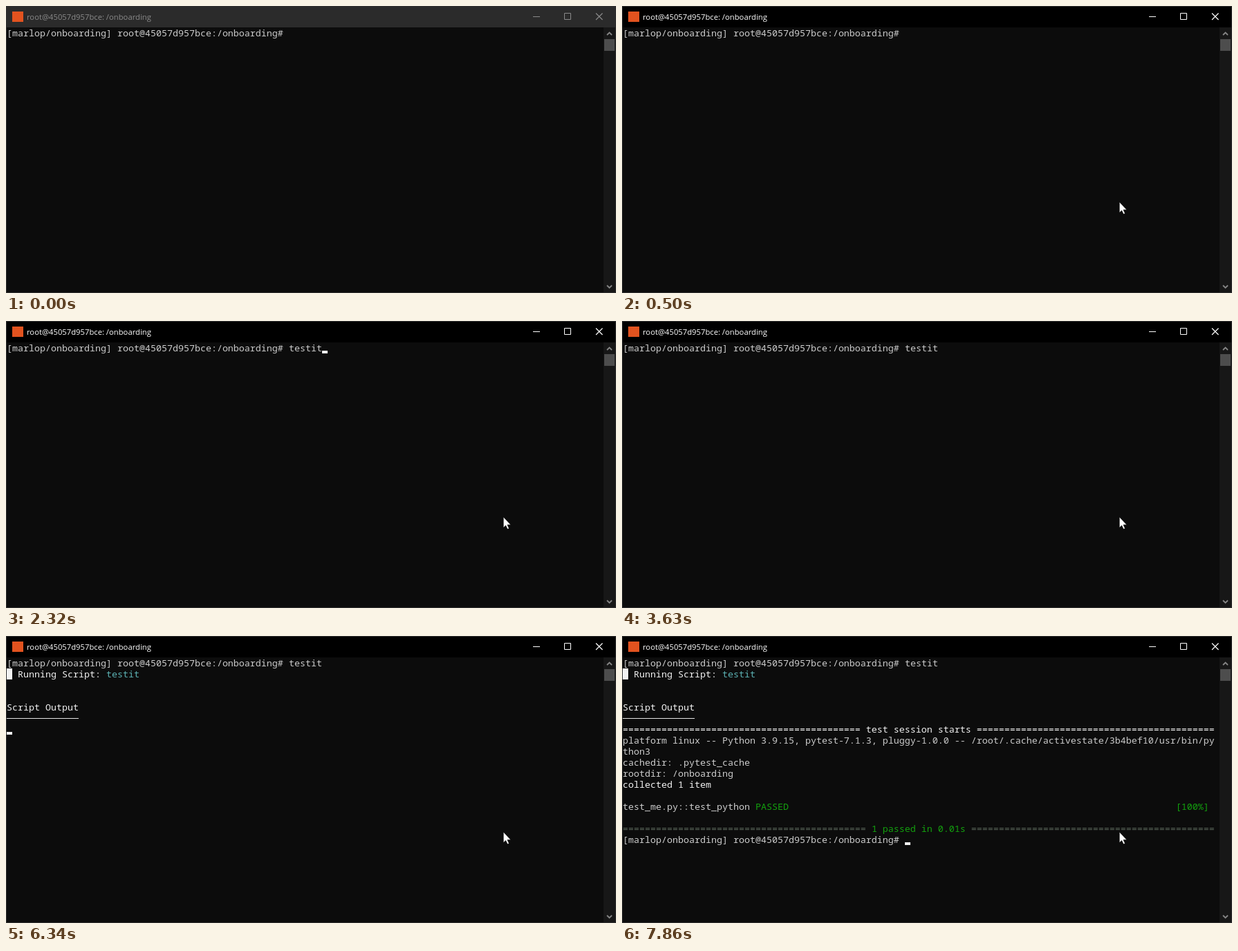
Animation, 882 px wide and 416 px high, one loop 8000 ms. Source, as an HTML page:

```html
<!DOCTYPE html>
<html lang="en">
<head>
<meta charset="utf-8">
<title>Terminal test run</title>
<style>
  html, body { margin: 0; width: 100%; height: 100%; overflow: hidden; background: #0c0c0c; }
  #stage { position: relative; width: 882px; height: 416px; overflow: hidden; background: #0c0c0c; }
  #stage > * { position: absolute; }

  /* every timed part shares one 8 s clock with hard cuts */
  .bar, .typed, .head, .result, .caret, .mouse { animation: 8s step-end infinite; }

  .bar {
    left: 0; top: 0; width: 882px; height: 31px;
    font: 11.25px/31px "Open Sans", "Noto Sans", sans-serif;
    animation-name: focus;
  }
  .bar span { position: absolute; left: 30px; white-space: pre; }
  .bar svg { position: absolute; left: 0; top: 0; }
  .icon { position: absolute; left: 9px; top: 8px; width: 16px; height: 15px; background: #e2531f; }
  .frame { inset: 0; border: 1px solid #2f2f2f; }
  .scroll { left: 864px; top: 31px; }

  pre {
    left: 1px; margin: 0; color: #ccc;
    font: 13.3333px/16px "Noto Sans Mono", "DejaVu Sans Mono", monospace;
    font-variant-ligatures: none;
  }
  pre b { font-weight: 400; color: #f2f2f2; }
  .cyan { color: #5cb3b5; }
  .green { color: #13a10e; }
  .dim { color: #5b675b; }

  .prompt { top: 31px; }
  .typed { left: 409px; top: 31px; overflow: hidden; animation-name: type; }
  .head { left: 0; top: 0; animation-name: head; }
  .head > * { position: absolute; }
  .head pre { top: 47px; }
  .block { left: 1px; top: 47px; width: 8px; height: 16px; background: #f2f2f2; }
  .rule { left: 1px; top: 119px; width: 104px; height: 1px; background: #e4e4e4; }
  .result { top: 127px; animation-name: result; }

  .caret { left: 0; top: 0; width: 8px; height: 4px; background: #f2f2f2; animation-name: caret; }
  .mouse { left: 0; top: 0; animation-name: mouse; }

  @keyframes focus {
    0% { background: #2b2b2b; color: #8a8a8a; }
    6.25%, 100% { background: #000; color: #fff; }
  }
  @keyframes type {
    0% { width: 0; }
    22.75% { width: 8px; animation-timing-function: steps(5); }
    29%, 100% { width: 48px; }
  }
  @keyframes head {
    0% { opacity: 0; }
    65.25%, 100% { opacity: 1; }
  }
  @keyframes result {
    0% { opacity: 0; }
    98.25%, 100% { opacity: 1; }
  }
  @keyframes caret {
    0% { opacity: 0; transform: translate(409px, 43px); }
    12.75% { opacity: 1; }
    19% { opacity: 0; }
    22.75% { opacity: 1; transform: translate(417px, 43px); animation-timing-function: steps(5); }
    29% { opacity: 1; transform: translate(457px, 43px); }
    37.75% { opacity: 1; transform: translate(1px, 59px); }
    45.375% { opacity: 0; }
    52.875% { opacity: 1; }
    59.125% { opacity: 0; }
    65.25% { opacity: 1; transform: translate(1px, 139px); }
    71.875% { opacity: 0; }
    79.25% { opacity: 1; }
    85.5% { opacity: 0; }
    91.75% { opacity: 1; }
    98.25%, 100% { opacity: 1; transform: translate(409px, 299px); }
  }
  @keyframes mouse {
    0% { opacity: 0; transform: translate(815px, 402px); }
    1.25% { opacity: 1; transform: translate(815px, 402px); }
    2.5% { opacity: 1; transform: translate(752px, 324px); }
    3.875%, 100% { opacity: 1; transform: translate(719px, 284px); }
  }
</style>
</head>
<body>
<div id="stage">
  <div class="bar">
    <i class="icon"></i>
    <span>root@45057d957bce: /onboarding</span>
    <svg width="882" height="31" fill="none" stroke="currentColor">
      <path d="M762 15.5h10M807.5 10.5h9v9h-9z"/>
      <path d="M853 10.5l9.5 9.5M862.5 10.5l-9.5 9.5" stroke-width="1.2"/>
    </svg>
  </div>

  <svg class="scroll" width="17" height="385">
    <path fill="#171717" d="M0 0h17v385h-17z"/>
    <path fill="#4d4d4d" d="M1 17h15v17h-15z"/>
    <path fill="none" stroke="#858585" stroke-width="1.8" d="M5 11l3.5-3.5 3.5 3.5M5 374l3.5 3.5 3.5-3.5"/>
  </svg>
  <div class="frame"></div>

  <pre class="prompt">[marlop/onboarding] root@45057d957bce:/onboarding#</pre>
  <pre class="typed">testit</pre>

  <div class="head">
    <i class="block"></i>
<pre>  <b>Running Script:</b> <span class="cyan">testit</span>


<b>Script Output</b></pre>
    <i class="rule"></i>
  </div>

<pre class="result"><b>=========================================== test session starts ===========================================</b>
platform linux -- Python 3.9.15, pytest-7.1.3, pluggy-1.0.0 -- /root/.cache/activestate/3b4bef10/usr/bin/py
thon3
cachedir: .pytest_cache
rootdir: /onboarding
<b>collected 1 item</b>

test_me.py::test_python <span class="green">PASSED</span>                                                                      <span class="green">[100%]</span>

<span class="dim">============================================</span> <span class="green">1 passed in 0.01s</span> <span class="dim">============================================</span>
[marlop/onboarding] root@45057d957bce:/onboarding#</pre>

  <div class="caret"></div>
  <svg class="mouse" width="14" height="20">
    <path fill="#fff" stroke="#000" stroke-width=".6" d="M.2 0v15.6l3.4-3.2 2.5 5.3 2.3-1-2.4-5.2h4.9z"/>
  </svg>
</div>
</body>
</html>
```
